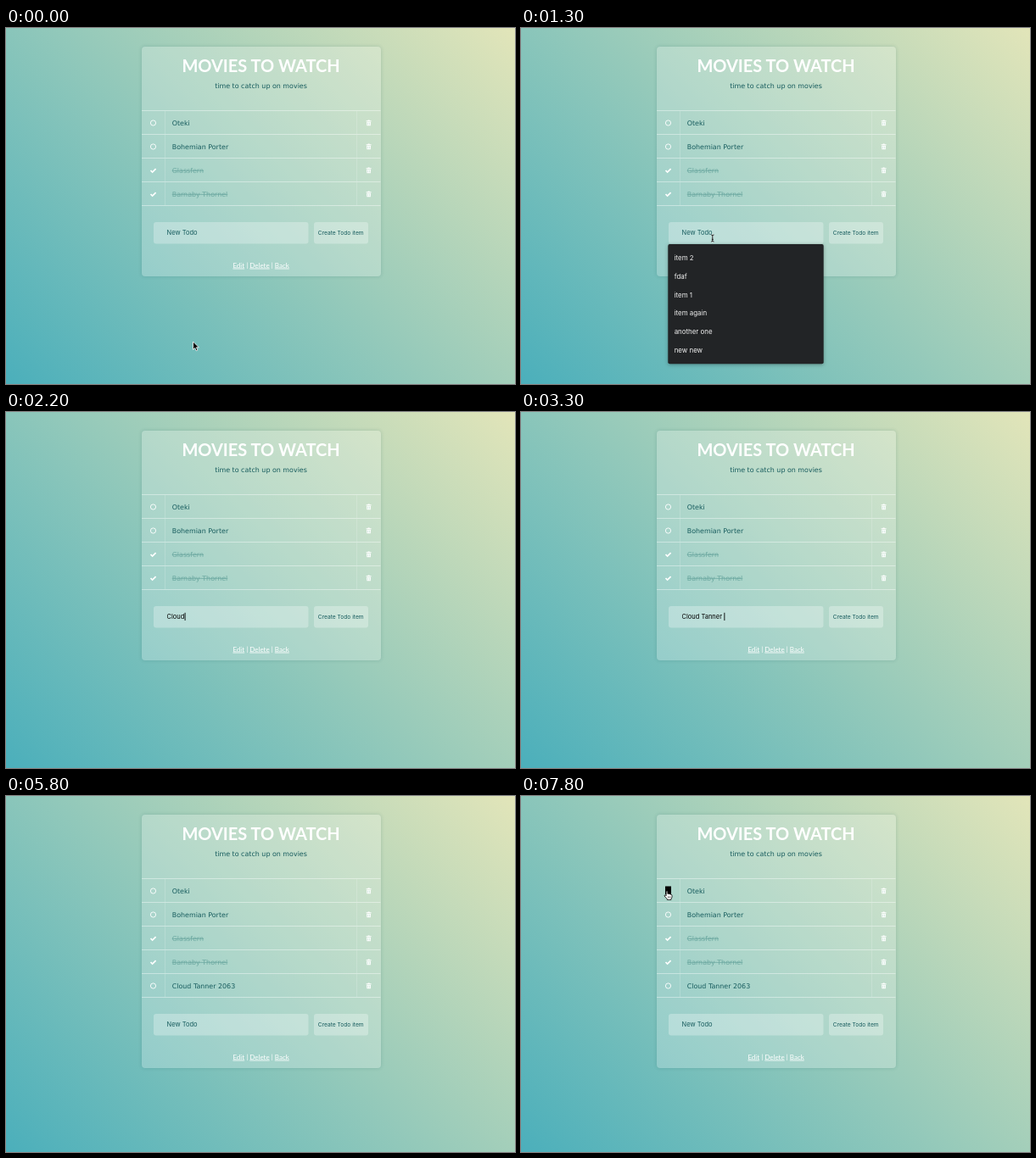
Recreate the animation shown at these times as an HTML page. Size 600 by 420 pixels, loop 8000 ms.

```html
<!DOCTYPE html>
<html lang="en">
<head>
<meta charset="utf-8">
<title>Todo list</title>
<style>
  html, body { margin: 0; width: 100%; height: 100%; overflow: hidden; }
  #stage {
    position: relative; width: 600px; height: 420px; overflow: hidden;
    background: linear-gradient(45deg, #4bafbb, #e2e5b9);
  }
  #card {
    position: absolute; left: 160px; top: 22px; width: 281.5px; height: 271px;
    border-radius: 4px; background: rgba(255, 255, 255, .23);
    box-shadow: 0 0 4px rgba(30, 90, 90, .2);
  }
  svg { position: absolute; left: 0; top: 0; }
  text { white-space: pre; }
  .title { font: 700 20px Lato, sans-serif; fill: #fff; text-anchor: middle; }
  .body { font: 7.95px "DejaVu Sans", sans-serif; fill: #175c5e; }
  .mid { text-anchor: middle; }
  .done { fill: #6ba8a0; text-decoration: line-through; }
  .ui { font: 7.5px Inter, sans-serif; fill: #175c5e; }
  .ui.typed { fill: #000; }
  .ui.button { font-size: 6.65px; text-anchor: middle; }
  .ui.option { font-size: 7.9px; fill: #f2f2f2; }
  .links { font: 8px Lato, sans-serif; fill: #fff; text-anchor: middle; }
  .links .a { text-decoration: underline; }
  .rule { stroke: #fff; stroke-opacity: .45; stroke-width: .9; }
  .rule.v { stroke-opacity: .2; }
  .field { fill: #fff; fill-opacity: .28; }
  .panel { fill: #222426; filter: drop-shadow(0 1px 2px rgba(0, 0, 0, .3)); }
</style>
</head>
<body>
<div id="stage">
  <div id="card"></div>
  <svg width="600" height="420" viewBox="0 0 600 420">
    <defs>
      <g id="ring"><circle r="3.1" fill="none" stroke="#fff" stroke-width=".9"/></g>
      <g id="check"><path d="M-3 0L-.9 2.1L3.1 -1.9" fill="none" stroke="#fff" stroke-width="1.7"/></g>
      <g id="trash" fill="#fff">
        <path d="M-3 -2.7H-1.2L-.8 -3.5H.8L1.2 -2.7H3V-1.8H-3Z"/>
        <path d="M-2.5 -1.3H2.5L2.2 3.3H-2.2Z"/>
        <path d="M-1 -.4V2.4M1 -.4V2.4" stroke="#a9d2c2" stroke-width=".5"/>
      </g>
    </defs>

    <text class="title" x="300.5" y="52.2">MOVIES TO WATCH</text>
    <text class="body mid" x="300.5" y="71.3">time to catch up on movies</text>
    <path class="rule" d="M160 97.5H441.5"/>
    <g id="rows"></g>
    <rect id="press" x="170" y="106.5" width="7" height="9.5" fill="#000"/>

    <g id="foot">
      <rect class="field" x="174" y="229" width="182.5" height="25.5" rx="3"/>
      <rect class="field" x="363" y="229" width="64" height="25.5" rx="3"/>
      <text id="entry" class="ui" x="189.5" y="244">New Todo</text>
      <rect id="caret" y="236.8" width=".9" height="9.2"/>
      <text class="ui button" x="394.7" y="244.2">Create Todo item</text>
      <text class="links" x="300.6" y="282.6"><tspan class="a">Edit</tspan> | <tspan class="a">Delete</tspan> | <tspan class="a">Back</tspan></text>
    </g>

    <g id="menu">
      <rect class="panel" x="173.3" y="255" width="183.4" height="141.3" rx="2"/>
    </g>

    <g id="arrow">
      <path d="M0 0V9.4L2.2 7.4L3.7 10.8L5.4 10L3.9 6.8H6.8Z" fill="#000" stroke="#fff" stroke-width=".8"/>
    </g>
    <g id="beam" fill="none">
      <path d="M-1.7 -4Q0 -4 0 -3Q0 -4 1.7 -4M0 -3V3M-1.7 4Q0 4 0 3Q0 4 1.7 4M-1 1.3H1" stroke="#fff" stroke-width="1.8" stroke-opacity=".6"/>
      <path d="M-1.7 -4Q0 -4 0 -3Q0 -4 1.7 -4M0 -3V3M-1.7 4Q0 4 0 3Q0 4 1.7 4M-1 1.3H1" stroke="#000" stroke-width=".9"/>
    </g>
    <g id="hand">
      <path d="M-.9 .8Q0 -.7 .9 .8V3.6Q2 2.8 2.8 4Q4 3.3 4.5 4.6Q6 4.2 6 5.6V7.6L5 9.6V10.6H.2V9.6L-3 6.2Q-3 4.7 -1.6 5.3L-.9 6Z"
        fill="#fff" stroke="#000" stroke-width=".8" stroke-linejoin="round"/>
      <path d="M1.3 6.6V8.6M2.7 6.6V8.6M4.1 6.6V8.6" stroke="#000" stroke-width=".5"/>
    </g>
  </svg>
</div>
<script>
const $ = id => document.getElementById(id);
const LOOP = 8000, TICK = 100;
const TITLE = "Cloud Tanner 2063";
const items = [["Oteki"], ["Bohemian Porter"], ["Glassfern", true], ["Barnaby Thornel", true], [TITLE]];
const options = ["item 2", "fdaf", "item 1", "item again", "another one", "new new"];

// All times below are counted in ticks.
const keys = [14, 16, 17, 19, 22, 23, 25, 26, 28, 29, 30, 32, 33, 41, 42, 43, 45];
const SENT = 58;
const path = [
  [0, 220.5, 370], [1, 221, 358], [4, 226, 300], [7, 226, 256], [8, 225.5, 249], [13, 225.8, 248],
  [62, 214, 300], [63, 196, 334], [64, 176, 320], [66, 143, 246], [68, 127, 182],
  [69, 125, 167], [70, 140, 157], [72, 161, 128], [74, 170, 116], [78, 172, 111.8]
];

$("rows").innerHTML = items.map(([name, done], i) => {
  const y = 112 + 28 * i;
  return `<g>
    <path class="rule v" d="M187.5 ${y - 14}V${y + 13}M413.5 ${y - 14}V${y + 13}"/>
    <path class="rule" d="M160 ${y + 13.5}H441.5"/>
    <g class="mark" transform="translate(173.5 ${y})"><use href="#${done ? "check" : "ring"}"/></g>
    <text class="body ${done ? "done" : ""}" x="195.7" y="${y + 2.6}">${name}</text>
    <use href="#trash" x="427.6" y="${y}"/>
  </g>`;
}).join("");
$("menu").innerHTML += options.map((s, i) =>
  `<text class="ui option" x="180.7" y="${273.7 + 21.9 * i}">${s}</text>`).join("");

const show = (el, on) => { el.style.display = on ? "" : "none"; };
const newRow = $("rows").lastElementChild;
const firstMark = document.querySelector(".mark");

function pointer(k) {
  let i = 0;
  while (i < path.length - 2 && k >= path[i + 1][0]) i++;
  const [a, ax, ay] = path[i], [b, bx, by] = path[i + 1];
  const f = Math.min(1, (k - a) / (b - a));
  return [ax + (bx - ax) * f, ay + (by - ay) * f];
}

function draw(k) {
  const sent = k >= SENT;
  const typing = k >= keys[0] && !sent;
  const count = keys.filter(t => t <= k).length;

  show(newRow, sent);
  $("card").style.height = (sent ? 299 : 271) + "px";
  $("foot").setAttribute("transform", `translate(0 ${sent ? 28 : 0})`);

  const entry = $("entry");
  entry.textContent = typing ? TITLE.slice(0, count) : "New Todo";
  entry.classList.toggle("typed", typing);
  // The caret blinks every five ticks after the latest key.
  const blink = typing && Math.floor((k - keys[count - 1]) / 5) % 2 === 0;
  show($("caret"), blink);
  if (blink) $("caret").setAttribute("x", 189.8 + entry.getComputedTextLength());

  show($("menu"), k >= 8 && k < keys[0]);
  const pressed = k >= 78;
  show($("press"), pressed);
  show(firstMark, !pressed);

  const moving = k < keys[0] || k >= 62;
  const kind = !moving ? "" : k >= 74 ? "hand" : k >= 8 && k < keys[0] ? "beam" : "arrow";
  const [x, y] = pointer(k);
  for (const id of ["arrow", "beam", "hand"]) {
    show($(id), id === kind);
    $(id).setAttribute("transform", `translate(${x} ${y})`);
  }
}

let last = -1;
function loop() {
  const k = Math.floor(performance.now() % LOOP / TICK);
  if (k !== last) draw(last = k);
  requestAnimationFrame(loop);
}
loop();
</script>
</body>
</html>
```
